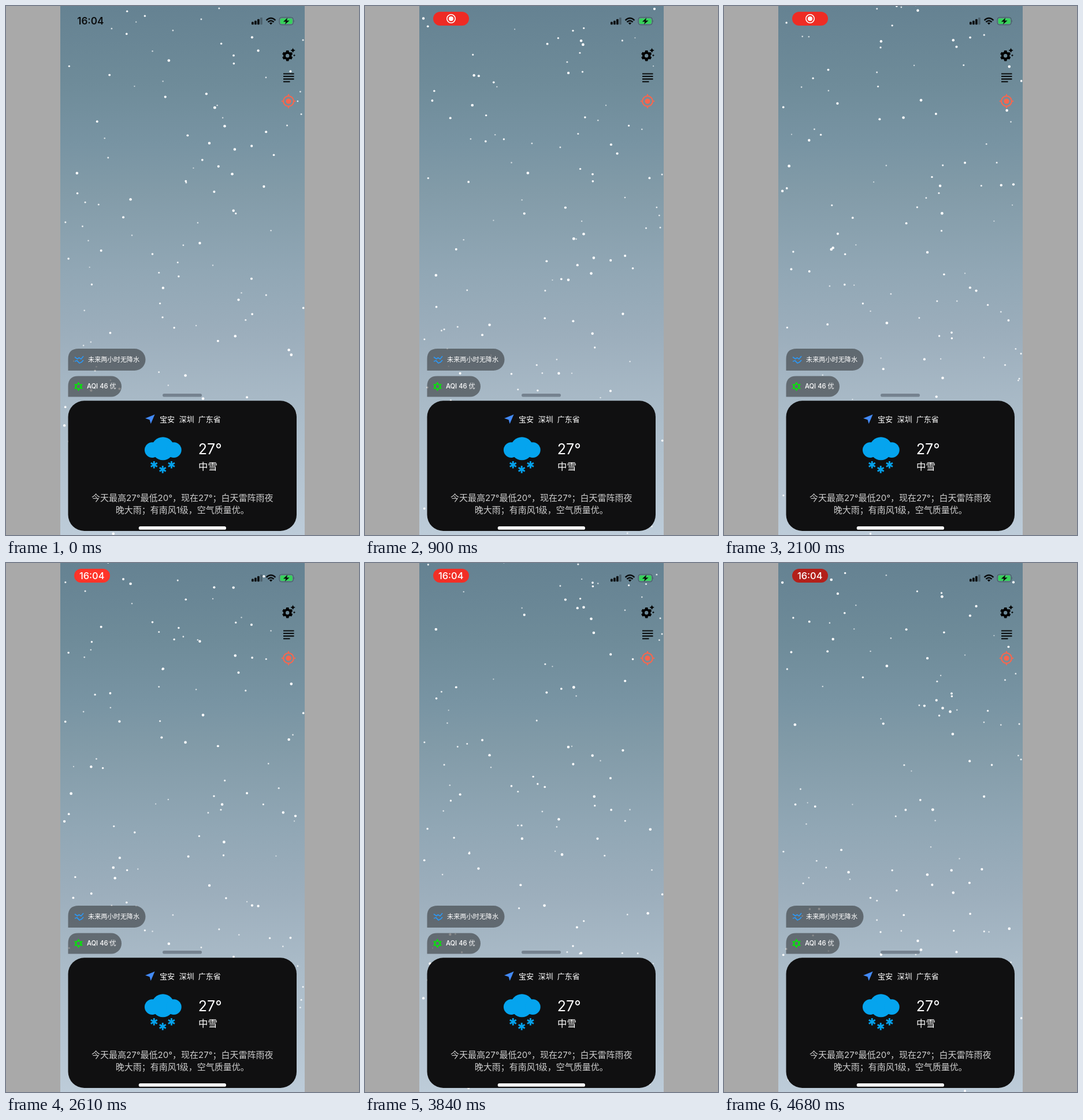
These frames come from a looping animation (611 by 917 pixels, 4.71 s). An HTML page with a canvas:

```html
<!DOCTYPE html>
<html lang="zh-CN">
<head>
<meta charset="utf-8">
<title>天气</title>
<style>
  html, body { margin: 0; width: 100%; height: 100%; overflow: hidden; background: #a9a9a9; }
  #stage { position: absolute; left: 0; top: 0; width: 611px; height: 917px; overflow: hidden; }
  #sky {
    position: absolute; left: 94px; top: 0; width: 422.5px; height: 917px;
    background: linear-gradient(#658292 0, #6e8b99 130px, #7894a3 240px, #829ba8 320px,
      #91a7b5 460px, #9caebc 570px, #a9bac7 690px, #bdccd9 917px);
  }
  #snow, svg { position: absolute; left: 0; top: 0; }
  text { font-family: Inter, "Noto Sans CJK SC", "Noto Sans CJK", sans-serif; fill: #fff; }
  .mid { font-weight: 500; }
  .clock { font-weight: 600; text-anchor: middle; }
  .note { font-size: 15px; fill: #cdcdcd; text-anchor: middle; }
</style>
</head>
<body>
<div id="stage">
  <div id="sky"></div>
  <canvas id="snow" width="611" height="917"></canvas>
  <svg width="611" height="917" viewBox="0 0 611 917">
    <defs>
      <path id="flake" d="M0-6.3V6.3M-5.5-3.2L5.5 3.2M-5.5 3.2L5.5-3.2" stroke="#05a1eb" stroke-width="2.9"/>
      <path id="spark" d="M0-4.4Q.7-.7 4.4 0Q.7 .7 0 4.4Q-.7 .7-4.4 0Q-.7-.7 0-4.4Z"/>
    </defs>

    <!-- status bar -->
    <text id="time" class="clock" x="146.3" y="32.4" font-size="17" style="fill:#0b0d0e">16:04</text>
    <g id="pill">
      <rect id="pillBox" x="118" y="10" width="62" height="24" rx="12"/>
      <g id="rec">
        <circle cx="149" cy="22" r="7.2" fill="none" stroke="#fff" stroke-width="1.6"/>
        <circle cx="149" cy="22" r="4.1" fill="#fff"/>
      </g>
      <text id="pillTime" class="clock" x="148.7" y="28" font-size="16.4" style="font-weight:500">16:04</text>
    </g>
    <g fill="#0a0c0d">
      <rect x="425" y="27.6" width="3.8" height="4.6" rx="1"/>
      <rect x="430" y="25.6" width="3.8" height="6.6" rx="1"/>
      <rect x="435" y="22.8" width="3.8" height="9.4" rx="1"/>
      <rect x="440" y="20" width="3.8" height="12.2" rx="1" opacity=".28"/>
    </g>
    <g fill="none" stroke="#0a0c0d" stroke-width="2.4">
      <path d="M450.6 24.8Q458.5 17.4 466.4 24.8"/>
      <path d="M453.4 27.8Q458.5 23.2 463.6 27.8"/>
    </g>
    <path d="M455.7 29.6Q458.5 27.6 461.3 29.6L458.5 32.6Z" fill="#0a0c0d"/>
    <rect x="473" y="19.7" width="24.4" height="13" rx="4" fill="none" stroke="#44575f"/>
    <rect x="474.7" y="21.4" width="21" height="9.6" rx="2.5" fill="#36d25b"/>
    <path d="M498.6 24.2Q500.4 26.2 498.6 28.4Z" fill="#44575f"/>
    <path d="M487.2 20.6L479.8 27.2H484.4L482.8 32L490.6 25.2H486Z" fill="#0a0c0d"/>

    <!-- side tools -->
    <g id="gear" transform="translate(487.2 86.2)"></g>
    <use href="#spark" x="496.6" y="77"/>
    <use href="#spark" transform="translate(499 85.6) scale(.5)"/>
    <path d="M480 117.5H498.5M480 122H498.5M480 126.6H498.5M480 131.2H491.5" stroke="#0a0c0d" stroke-width="2.1"/>
    <g transform="translate(489 165)" fill="none" stroke="#f6674f" stroke-width="2.2">
      <circle r="8.9"/>
      <circle r="4.6" fill="#f6674f" stroke="none"/>
      <path d="M0-12.2V-8M0 8V12.2M-12.2 0H-8M8 0H12.2"/>
    </g>

    <!-- chips and handle -->
    <g fill="#2c2e30" fill-opacity=".55">
      <path d="M107.5 632V612Q107.5 594 125.5 594H222.5A19 19 0 0 1 222.5 632Z"/>
      <path d="M107.5 677.5V659Q107.5 641.5 125 641.5H182A18 18 0 0 1 182 677.5Z"/>
    </g>
    <path d="M119 608.5L123.5 611.8L126.5 609.8L130 612L134 607M119 616L123 614.8L127 619L130.5 617.5L134 613.8"
      fill="none" stroke="#2c98f5" stroke-width="1.7"/>
    <text class="mid" x="142" y="616.8" font-size="11.15">未来两小时无降水</text>
    <path d="M125.4 651.2L128 655.4H133L130.5 659.5L133 663.6H128L125.4 667.8L122.8 663.6H117.8L120.3 659.5L117.8 655.4H122.8ZM125.4 656.3A3.2 3.2 0 1 0 125.4 662.7A3.2 3.2 0 1 0 125.4 656.3Z"
      fill="#08e30b" fill-rule="evenodd"/>
    <text class="mid" x="140" y="663" font-size="11.2">AQI 46 优</text>
    <rect x="271" y="672" width="68" height="5.6" rx="2.8" fill="#48515f" fill-opacity=".52"/>

    <!-- weather card -->
    <rect x="107.5" y="684.3" width="395.5" height="225.7" rx="28" fill="#101011"/>
    <path d="M257.6 708L250.6 724.2L248.6 717.2L241 714.8Z" fill="#438af6"/>
    <g class="mid" font-size="13">
      <text x="266" y="720.7">宝安</text>
      <text x="299.7" y="720.7">深圳</text>
      <text x="332.7" y="720.7">广东省</text>
    </g>
    <g fill="#05a4ee">
      <ellipse cx="271.6" cy="767.2" rx="19.6" ry="20"/>
      <circle cx="253.2" cy="769.6" r="13.3"/>
      <circle cx="290.4" cy="769.6" r="13.3"/>
    </g>
    <use href="#flake" x="256.2" y="795.2"/>
    <use href="#flake" x="271.2" y="803.4"/>
    <use href="#flake" x="286.4" y="795.2"/>
    <text x="332.8" y="777.4" font-size="25">27°</text>
    <text class="mid" x="333" y="804.2" font-size="16.4">中雪</text>
    <text class="note" x="305.3" y="858.3">今天最高27°最低20°，现在27°；白天雷阵雨夜</text>
    <text class="note" x="305.3" y="878.8">晚大雨；有南风1级，空气质量优。</text>
    <rect x="229.7" y="902" width="151.3" height="5.8" rx="2.9" fill="#fff"/>
  </svg>
</div>
<script>
  const LOOP = 4710, STEP = 30, TRAVEL = 930, COUNT = 144;
  const $ = id => document.getElementById(id);
  const ctx = $('snow').getContext('2d');

  const tooth = a => `<rect x="-2.4" y="-9.2" width="4.8" height="5" rx="1" transform="rotate(${a})"/>`;
  $('gear').innerHTML = [0, 60, 120, 180, 240, 300].map(tooth).join('') +
    '<circle r="5.2" fill="none" stroke="#000" stroke-width="4"/>';

  let seed = 16042;
  const rand = () => (seed = (seed * 16807) % 2147483647) / 2147483647;

  const flakes = Array.from({ length: COUNT }, (_, i) => ({
    x: 95 + rand() * 420,
    y: (i + rand()) / COUNT * TRAVEL,
    speed: .19 + rand() * .075,
    r: 1.1 + rand() * 1.3
  }));

  // time in ms, then the red of the recording pill
  const reds = [
    [0, 238, 43, 36], [2100, 238, 44, 36], [2610, 255, 52, 41],
    [3330, 250, 50, 40], [3840, 242, 47, 38], [4680, 179, 32, 26]
  ];

  function redAt(t) {
    const i = Math.max(1, reds.findIndex(k => k[0] > t));
    const a = reds[i - 1], b = reds[i];
    if (t >= 4680) return `rgb(${reds[5].slice(1)})`;
    const p = (t - a[0]) / (b[0] - a[0]);
    return `rgb(${[1, 2, 3].map(c => Math.round(a[c] + (b[c] - a[c]) * p))})`;
  }

  const ramp = (t, from, to) => Math.min(1, Math.max(0, (t - from) / (to - from)));

  function drawSnow(t) {
    ctx.clearRect(0, 0, 611, 917);
    ctx.save();
    ctx.beginPath();
    ctx.rect(94, 0, 422.5, 917);
    ctx.clip();
    for (const f of flakes) {
      ctx.globalAlpha = .6 + .4 * ramp(f.r, 1.1, 1.8);
      ctx.fillStyle = '#fff';
      ctx.beginPath();
      ctx.arc(f.x, (f.y + f.speed * t) % TRAVEL - 6, f.r, 0, 7);
      ctx.fill();
    }
    ctx.restore();
  }

  function draw(t) {
    drawSnow(t);
    const shown = ramp(t, 330, 570), swap = ramp(t, 2250, 2460);
    $('time').setAttribute('opacity', 1 - shown);
    $('pill').setAttribute('opacity', shown);
    $('pillBox').setAttribute('fill', redAt(t));
    $('rec').setAttribute('opacity', 1 - swap);
    $('pillTime').setAttribute('opacity', swap);
  }

  const start = performance.now();
  function tick() {
    const t = (performance.now() - start) % LOOP;
    draw(Math.floor(t / STEP) * STEP);
    requestAnimationFrame(tick);
  }
  tick();
</script>
</body>
</html>
```
